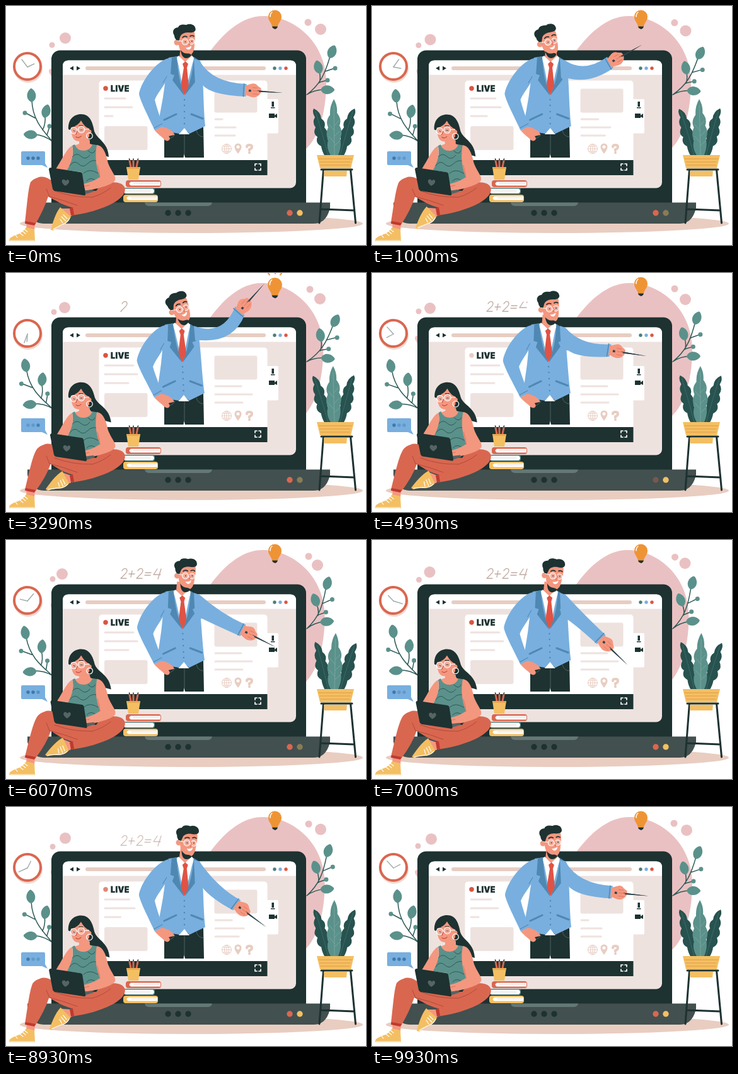
An HTML page for the animation above (10 s loop, 571 by 380 pixels).

```html
<!DOCTYPE html>
<html lang="en">
<head>
<meta charset="utf-8">
<title>Live lesson</title>
<style>
  html, body { margin: 0; height: 100%; overflow: hidden; background: #fff; }
  svg { display: block; width: 571px; height: 380px; }
  .dark { fill: #1d3231; } .skin { fill: #f4977f; } .white { fill: #fff; }
  .red { fill: #d96750; } .yellow { fill: #f4bf63; } .blue { fill: #78afdf; }
  .pale { fill: #eee2df; } .blush { fill: #e8cdc2; } .pink { fill: #eac1c2; }
  .teal { fill: #5b918b; } .deep { fill: #27524f; } .navy { fill: #4f88b2; }
  .line { fill: none; stroke-linecap: round; stroke-linejoin: round; }
  .ink { stroke: #1d3231; } .stem { stroke: #2d5a57; stroke-width: 1.5; }
  .crease { stroke: #b24a3b; stroke-width: 1; }
  .glasses { fill: #ffffff38; stroke: #fff; stroke-width: 1.1; }
</style>
</head>
<body>
<svg viewBox="0 0 571 380">
  <defs>
    <path id="leaf" d="M0 0C-9-4-9-15-2-21Q0-23 2-21C9-15 9-4 0 0Z"/>
    <path id="blade" d="M488 163Q499 168 500 179Q508 184 505 193Q513 202 510 211Q517 224 515 239H506Q501 231 500 223Q490 218 494 208Q486 203 491 193Q485 185 490 177Q485 169 488 163Z"/>
  </defs>

  <ellipse cx="294" cy="346" rx="272" ry="15" fill="#e9cdc1"/>
  <path id="blob" class="pink" d="M72 100C66 100 67 107 76 116L470 232C495 215 508 170 508 122C508 58 458 16 408 16C372 16 343 46 323 73C250 140 110 95 72 100Z"/>
  <g id="bubbles" class="pink"><circle r="9"/><circle r="4.500"/><circle r="9"/><circle r="5.500"/></g>

  <g id="branchL">
    <path class="line stem" d="M74 216C60 199 42 182 41 150M58 197Q63 188 62 174M73 215Q62 206 46 204M46 178L31 170M65 205L69 192"/>
    <g class="teal">
      <use href="#leaf" transform="translate(41 153)rotate(-3)"/>
      <use href="#leaf" transform="translate(61 178)rotate(14)"/>
      <use href="#leaf" transform="translate(50 205)rotate(-87)"/>
      <circle cx="30" cy="170" r="3.500"/><circle cx="69" cy="191" r="3.500"/>
    </g>
  </g>
  <g id="branchR">
    <path class="line stem" d="M477 141C498 125 506 108 514 80M497 122Q500 112 496 102M477 141Q489 133 505 133M506 104L521 99M498 121L510 118"/>
    <g class="teal">
      <use href="#leaf" transform="translate(513 83)rotate(22)"/>
      <use href="#leaf" transform="translate(498 108)rotate(-14)"/>
      <use href="#leaf" transform="translate(499 133)rotate(91)"/>
      <circle cx="522" cy="99" r="3.500"/><circle cx="510" cy="118" r="3.500"/>
    </g>
  </g>

  <!-- laptop screen -->
  <rect class="dark" x="72" y="70.500" width="404" height="255" rx="14"/>
  <rect class="pale" x="90" y="86.500" width="370" height="203" rx="9"/>
  <path class="white" d="M90 109.500V95.500Q90 86.500 99 86.500H451Q460 86.500 460 95.500V109.500Z"/>
  <path class="dark" d="M101 99L107 95.500V102.500ZM118 99L112 95.500V102.500Z"/>
  <rect class="blush" x="126" y="96" width="286" height="6" rx="3"/>
  <circle cx="426" cy="99" r="2.700" fill="#4c7d79"/><circle class="blue" cx="435" cy="99" r="2.700"/><circle cx="444" cy="99" r="2.700" fill="#e05344"/>
  <path class="white" d="M147.500 245V124Q147.500 118.500 153 118.500H409Q414.500 118.500 414.500 124V148H430Q432 148 432 150V200Q432 202.500 430 202.500H414.500V245Z"/>
  <rect class="pale" x="156" y="191" width="68.500" height="38" rx="3"/>
  <rect class="pale" x="330.500" y="131.500" width="68" height="38" rx="3"/>
  <g id="lines" class="line" stroke="#eee2df" stroke-width="3"></g>
  <circle class="blush" cx="158" cy="131" r="3.700"/><circle id="live" cx="158" cy="131" r="3.700" fill="#d95542"/>
  <text class="dark" x="166" y="135.700" font-family="Inter, sans-serif" font-weight="900" font-size="12.500" letter-spacing=".4" stroke="#1d3231" stroke-width=".4">LIVE</text>
  <path class="dark" d="M421.500 152H425V160H421.500ZM420 161H426.500V162.500H420ZM417 171H426V178H417ZM426 174L430 171V178L426 176Z"/>
  <g class="line" stroke="#e8cdc2" stroke-width="1">
    <circle cx="350" cy="227" r="7.500"/><ellipse cx="350" cy="227" rx="3.500" ry="7.500"/>
    <path d="M350 219.500V234.500M342.500 227H357.500M344 223H356M344 231H356"/>
    <path d="M382 224Q382 221 386 221Q390 221 390 224Q390 227 386 228V229.500M386 233V233.200" stroke-width="4"/>
  </g>
  <path class="blush" fill-rule="evenodd" d="M368 235Q362 227 362.500 224A5.500 5.500 0 0 1 373.500 224Q374 227 368 235ZM368 221.500A2.500 2.500 0 1 0 368 226.500A2.500 2.500 0 1 0 368 221.500Z"/>

  <!-- teacher -->
  <path class="dark" d="M251 192H313L314 241H284L282.500 235L281.500 241H251Z"/>
  <path class="line" stroke="#5c6e6b" stroke-width=".8" d="M251 211Q263 213 268 204M302 198Q304 208 313 208M283 205V236"/>
  <g id="body">
    <path class="blue" d="M258 82L272 80L297 82L308 87C314 103 312 150 316 191L291 203L283 195L275 203L245 198L243 178L249 145L254 110Z"/>
    <path class="white" d="M274 204L283 194L291 204ZM271 81L283 143L298 82Z"/>
    <path class="skin" d="M277 66L293 68L295 82L284 90L275 82Z"/>
    <path class="white" d="M274 79L284 89L276 99L270 82ZM295 79L284 89L292 99L299 83Z"/>
    <path d="M280 92L284.500 88L289 92L287 98L290 128L283 142L277 128L282 98Z" fill="#e05344"/>
    <path class="navy" d="M263 82L271 80C272 105 277 127 283 143L264 118L267 110L261 108ZM298 81L304 85L306 108L300 110L303 117L283 143C291 126 296 108 298 81Z"/>
    <g class="navy"><circle cx="283" cy="149" r="1.200"/><circle cx="283" cy="158" r="1.200"/><circle cx="283" cy="168" r="1.200"/><circle cx="283" cy="178" r="1.200"/><circle cx="283" cy="187" r="1.200"/></g>
    <path class="line" stroke="#4f88b2" stroke-width="3" d="M251 181L270 172M294 172L312 179"/>
    <path class="blue" d="M258 83C240 87 216 116 211 139C211 148 230 184 236 198L250 191C245 180 238 158 236 149C240 139 250 128 256 116Z"/>
    <path class="line" stroke="#4f88b2" stroke-width="1" d="M235 194L248 187M249 122Q252 117 255 112"/>
    <path class="skin" d="M236 198L247 192C257 193 268 201 267 205L258 207C263 212 257 217 252 213C246 207 240 203 236 198Z"/>
  </g>
  <path id="sleeve" class="blue"/>
  <path id="cuff" class="line" stroke="#4f88b2" stroke-width="1.500"/>
  <g id="hand">
    <path d="M0-1.500L58 0L0 2Z" fill="#30444a"/>
    <path class="skin" d="M-2-7L8-11Q14-13 18-8L23-5Q25 0 22 5Q16 12 8 10L-2 7Z"/>
    <path d="M4-1.500L58 0L4 2Z" fill="#30444a"/>
    <path class="skin" d="M7-6Q16-9 18-5Q14-1 20 0Q23 4 15 7Q9 8 8 2Z"/>
    <path class="line" stroke="#d9705c" stroke-width=".8" d="M10-5L17-5M11 0H20M11 5L19 5"/>
  </g>
  <g id="head">
    <path class="skin" d="M272 42C272 64 277 79 287 79C297 79 299 70 299 59Q301 48 298 39Z"/>
    <path class="dark" d="M277 70C281 75 285 76 289 75.500Q293 76 294 78Q291 83 285 83C280 82 278 77 277 70Z"/>
    <circle class="skin" cx="271" cy="58" r="4.500"/>
    <path class="dark" d="M271 55Q267 51 267 47C263 41 265 35 273 34C275 29 281 29 286 30C292 27 299 30 300 34C303 41 296 43 289 42C282 42 277 45 276 50L274 56Z"/>
    <path class="line ink" stroke-width="1.700" d="M280 50Q283 47 287 49M292 48Q295 46 298 48"/>
    <path class="dark" d="M283.500 56h1.800v2h-1.800zM294 55h1.800v2h-1.800z"/>
    <circle class="glasses" cx="284" cy="57" r="4.800"/><circle class="glasses" cx="294.500" cy="56.500" r="4.400"/>
    <path class="line" stroke="#fff" d="M279 56L271 55"/>
    <path class="white" d="M285 66Q290 67 294 63Q294 69 289 69.500Q286 69 285 66Z"/>
    <path class="line" stroke="#d9624f" d="M290 55Q293 60 290 62"/>
  </g>

  <rect class="dark" x="148" y="245" width="266.500" height="24"/>
  <path class="line" stroke="#fff" stroke-width="1.700" stroke-linecap="butt" d="M395 254V251H398M401 251H404V254M404 258V261H401M398 261H395V258"/>

  <!-- laptop base -->
  <path d="M34 312.500H514V321Q508 346 488 346H60Q40 346 34 321Z" fill="#42504f"/>
  <path d="M220 312.500H327Q326 318 319 318H228Q221 318 220 312.500Z" fill="#647876"/>
  <g class="dark"><circle cx="257" cy="329" r="4.700"/><circle cx="273" cy="329" r="4.700"/><circle cx="289" cy="329" r="4.700"/></g>
  <circle id="lampR" class="red" cx="450" cy="329" r="4.700"/><circle id="lampY" class="yellow" cx="466" cy="329" r="4.700"/>

  <!-- books and pencils -->
  <rect class="red" x="190" y="277" width="56" height="11" rx="4"/><path class="white" d="M198 279.500H245V285.500H198Q193 282.500 198 279.500Z"/>
  <rect x="188" y="289" width="48" height="10" rx="3" fill="#4c7d79"/><path class="white" d="M188 290.500H233Q237 294 233 298H188Z"/>
  <rect class="yellow" x="186" y="300" width="55" height="12" rx="4"/><path class="white" d="M194 302.500H240V308.500H194Q189 305.500 194 302.500Z"/>
  <path class="line" stroke="#d9c8c0" stroke-width=".7" d="M202 282H243M190 294H229M199 305H238"/>
  <path class="line" stroke="#d96750" stroke-width="3" d="M196 246L198 256M202 246V256M209 246L207 256"/>
  <path class="line ink" stroke-width="1.500" d="M195.500 243L196 245M202 243V245M209.500 243L209 245"/>
  <path class="yellow" d="M191 256H213L210 276H194Z"/><path d="M191 256H213L212.500 259H191.500Z" fill="#e9a94f"/>

  <!-- potted plant -->
  <path class="line ink" stroke-width="3" d="M503.500 260L497 345M546.500 260L554.500 345M499 323L552 325M500 260H549"/>
  <g id="plant">
    <use href="#blade" class="deep"/><use href="#blade" class="deep" transform="translate(1041)scale(-1 1)"/>
    <path class="teal" d="M520 148Q526 158 525 170Q533 180 529 190Q535 200 530 211Q533 224 526 239H516Q507 226 511 213Q506 203 511 193Q506 183 514 173Q513 160 520 148Z"/>
    <path class="line" stroke="#7eaaa3" stroke-width=".8" d="M520 158L521 237M521 190L528 182M521 207L529 199M521 222L530 214M521 198L512 188M521 217L512 207"/>
    <path class="line" stroke="#44716c" stroke-width=".8" d="M491 168Q501 200 511 237M550 168Q540 200 530 237"/>
  </g>
  <path class="yellow" d="M493 237H552L547 258H498ZM504 262H541L540 271H505Z"/>
  <path class="line" stroke="#e39a45" stroke-width="1.200" d="M496 243H549M498 248H546M499 253H545"/>

  <!-- clock -->
  <circle cx="35" cy="99" r="21" fill="none" stroke="#f0d9d0" stroke-width="4"/>
  <circle cx="34" cy="96" r="21" fill="#fff" stroke="#d96750" stroke-width="4"/>
  <g class="line" stroke="#9fa9a9" stroke-width="1.400"><path id="hour" d="M34 97V85"/><path id="minute" d="M34 97V82"/></g>

  <path class="blue" d="M26 231H60Q62 231 62 233V250L66 257L57 253H26Q24 253 24 251V233Q24 231 26 231Z"/>
  <g id="typing" fill="#3f78aa"><circle cx="35" cy="242" r="2.700"/><circle cx="43" cy="242" r="2.700"/><circle cx="51" cy="242" r="2.700"/></g>

  <!-- student -->
  <path id="hair" class="dark" d="M120 174C134 174 138 187 140 199C144 212 162 216 163 240C150 236 139 233 133 222L116 190Z"/>
  <path class="skin" d="M33 342L46 345L45 358L32 356Z"/>
  <path class="yellow" d="M32 352L45 355L46 374H5Q4 368 16 364Q26 361 32 352Z"/>
  <path class="line" stroke="#fff" stroke-width="1.200" d="M6 373H45M22 361L27 365M26 358L31 362M29 355L34 359M15 364L18 368"/>
  <g id="foot">
    <path class="skin" d="M88 322L103 322L105 333L97 338Z"/>
    <path class="yellow" d="M86 320L103 335Q98 346 88 349Q80 352 75 357L71 356C74 345 78 330 86 320Z"/>
    <path class="line" stroke="#fff" stroke-width="1.200" d="M101 337Q98 345 88 348L75 355M91 332L97 338M88 335L95 342M86 339L90 345"/>
  </g>
  <path id="leg" class="red"/>
  <path d="M31 342L47 345L45 349L30 346Z" fill="#c0392f"/>
  <path class="red" d="M148 287C164 277 184 279 188 288C193 300 174 314 150 322C135 328 118 331 104 333L101 322C115 317 128 311 136 304Z"/>
  <path d="M101 322L106 320L108 332L103 333Z" fill="#c0392f"/>
  <path class="line crease" d="M69 303Q66 296 64 291M69 303Q92 309 113 317M77 294Q105 305 137 304M137 304Q154 299 166 289"/>
  <g id="upper">
    <path class="skin" d="M116 207H133L133 219L146 223L140 235H109L106 223L116 219Z"/>
    <path class="teal" d="M109 220Q112 230 124 230Q134 229 137 220L144 221C143 240 148 251 151 270L147 290H124L119 264L96 261C102 245 109 240 105 222Z"/>
    <path class="line" stroke="#2d5a57" stroke-width="1" d="M105 240Q112 232 119 239Q126 246 133 237M101 254Q108 244 115 251T129 251T143 246M123 266Q132 257 146 266M128 278Q135 270 144 279M130 230Q138 238 141 230"/>
    <path class="skin" d="M106 222C97 224 90 243 79 259L96 263C103 249 108 240 105 222ZM144 221C155 222 159 236 162 250C168 265 175 270 173 277C168 285 147 290 126 294L122 283Q137 280 149 272C142 252 141 240 144 221Z"/>
    <path class="line" stroke="#d9705c" stroke-width=".9" d="M149 272Q148 262 145 253M123 287L132 285"/>
    <g id="face">
      <path class="dark" d="M99 196C98 181 107 172 119 172C133 172 139 185 137 200L134 214L116 202Z"/>
      <path class="skin" d="M103 193Q114 191 119 182Q125 193 132 195L132 207Q129 214 119 215C108 216 104 211 103 193Z"/>
      <circle class="skin" cx="132" cy="200" r="3.500"/>
      <circle cx="132.500" cy="206.500" r="4.800" fill="none" stroke="#fff" stroke-width="1.200"/>
      <path class="line ink" stroke-width="1.200" d="M104 192L109 191M116 190L122 190M107 198L109 199M118 197L121 197"/>
      <circle class="glasses" cx="107.500" cy="198" r="5.200"/><circle class="glasses" cx="119.500" cy="196.500" r="5.200"/>
      <path class="line" stroke="#fff" d="M125 196L132 196"/>
      <path class="line" stroke="#c64e3f" stroke-width="1.200" d="M113 199L111 204M111 208Q115 211 119 207"/>
    </g>
  </g>
  <g id="notebook">
    <path d="M123 300L139 295L137 292L120 294Z" fill="#566564"/>
    <path class="dark" d="M71 257L117 264Q120 264 121 267L126 299Q126 302 123 301L77 294Q75 293 74 291L68 260Q68 257 71 257Z"/>
    <path d="M94 286Q87 281 89 277Q92 274 95 278Q98 274 100 278Q101 282 94 286Z" fill="#566564"/>
  </g>

  <!-- idea -->
  <g id="bulb">
    <path d="M416 17A10.500 10.500 0 1 1 437 17C437 24 432 26 431 33H422C421 26 416 24 416 17Z" fill="#ee9435"/>
    <path class="dark" d="M422 32.500H431L430 35L427 37L423 35Z"/>
    <path class="line" stroke="#fff" stroke-width="1.500" d="M419 17Q419 12 422 10"/>
  </g>
  <path id="rays" class="line" stroke="#ee9435" stroke-width="2" d="M418 3L415-1M427 1V-4M435 3L438-1"/>
  <g id="sum" class="line" stroke="#c0aaa2" stroke-width="1.300"></g>
</svg>
<script>
const LOOP = 10000, KEYS = [0, 1930, 3290, 4930, 6070, 7930], N = KEYS.length;
const $ = id => document.getElementById(id);
const clamp = v => Math.min(1, Math.max(0, v));
const set = (el, attrs) => { for (const k in attrs) el.setAttribute(k, attrs[k]); };
const spin = (id, a, x, y) => set($(id), { transform: `rotate(${a} ${x} ${y})` });
const shift = (id, x, y) => set($(id), { transform: `translate(${x} ${y})` });

// Smooth cyclic curve through one value per key time
function pose(t, ...v) {
  const at = i => v[(i + N) % N];
  const time = i => KEYS[(i + N) % N] + LOOP * Math.floor(i / N);
  const slope = i => (at(i + 1) - at(i)) / (time(i + 1) - time(i));
  const tangent = i => {
    const a = slope(i - 1), b = slope(i);
    return a * b > 0 ? 2 * a * b / (a + b) : 0;
  };
  let i = N - 1;
  while (KEYS[i] > t) i--;
  const h = time(i + 1) - time(i), s = (t - time(i)) / h, r = 1 - s;
  return at(i) * r * r * (1 + 2 * s) + at(i + 1) * s * s * (3 - 2 * s)
    + h * s * r * (r * tangent(i) - s * tangent(i + 1));
}

// 1 while the phase lies between a and b, with short fades
function pulse(t, count, a, b) {
  const p = t * count / LOOP % 1;
  return clamp((p - a) / .05) * clamp((b - p) / .05);
}

function add(parent, attrs) {
  const el = document.createElementNS('http://www.w3.org/2000/svg', 'path');
  set(el, attrs);
  return $(parent).appendChild(el);
}

// x, y, short and long width
const lines = [[157, 147, 32, 45], [157, 161, 43, 51], [157, 175, 12, 37],
  [332, 180, 11, 41], [332, 193, 32, 58], [332, 206, 31, 43]]
  .map(([x, y, short, long]) => ({ x, y, short, long, el: add('lines', {}) }));

const strokes = ['M184 49Q187 44 191 46Q194 50 188 55L182 61H191', 'M195 54H204', 'M200 49L198 59',
  'M209 49Q212 44 216 46Q219 50 213 55L207 61H216', 'M221 52H230', 'M220 56H229',
  'M240 46L234 55H245', 'M246 46L241 62']
  .map(d => add('sum', { d, pathLength: 1 }));

function drawArm(t) {
  const ex = pose(t, 326, 356, 354, 330, 336, 335), ey = pose(t, 132, 103, 103, 126, 126, 139);
  const wx = pose(t, 381, 374, 371, 378, 376, 353), wy = pose(t, 134, 60, 60, 123, 144, 166);
  const pit = pose(t, 125, 107, 107, 123, 125, 128);
  const angle = pose(t, 4, -48, -48, 9, 27, 54), a = angle * Math.PI / 180;
  const nx = -Math.sin(a) * 10, ny = Math.cos(a) * 10;
  const top = `${wx - nx} ${wy - ny}`, bottom = `${wx + nx} ${wy + ny}`;
  set($('sleeve'), { d: `M298 84L307 87Q${ex - nx} ${ey - ny} ${top}L${bottom}Q${ex + nx} ${ey + ny} 311 ${pit}L300 ${pit}Z` });
  const cx = wx - Math.cos(a) * 4, cy = wy - Math.sin(a) * 4;
  set($('cuff'), { d: `M${cx - nx} ${cy - ny}L${cx + nx} ${cy + ny}` });
  set($('hand'), { transform: `translate(${wx} ${wy})rotate(${angle})` });
}

function drawScreen(t) {
  const grow = pose(t, 0, 1, 1, 1, 1, .98);
  for (const l of lines) set(l.el, { d: `M${l.x} ${l.y}h${l.short + (l.long - l.short) * grow}` });
  set($('live'), { opacity: 1 - pulse(t, 3, .4, .7) });
  set($('lampR'), { opacity: 1 - .65 * pulse(t, 3, .42, .54) });
  set($('lampY'), { opacity: 1 - .6 * pulse(t, 4, .25, .55) });
  [[.55, .9], [.2, .75], [0, .66]].forEach(([a, b], i) =>
    set($('typing').children[i], { opacity: 1 - .6 * pulse(t, 5, a, b) }));
}

function drawIdea(t) {
  const lit = clamp((t - 2700) / 350) * clamp((4200 - t) / 350);
  set($('bulb'), { transform: `translate(426.5 ${20 + 2 * lit})scale(${1 + .08 * lit})translate(-426.5 -20)` });
  set($('rays'), { opacity: lit });
  const written = (t - 3090) / 2080 * strokes.length;
  strokes.forEach((el, i) => {
    const p = clamp(written - i);
    set(el, { 'stroke-dasharray': `${p} 2`, opacity: p ? clamp((9300 - t) / 500) : 0 });
  });
}

function drawScenery(t) {
  const width = 1 - .014 * (1 - Math.cos(t * 4 * Math.PI / LOOP));
  set($('blob'), { transform: `translate(290)scale(${width} 1)translate(-290)` });
  const dots = $('bubbles').children;
  const bx = pose(t, 94, 91, 93, 92, 89, 94), by = pose(t, 51, 55, 55, 56, 54, 49);
  const sx = pose(t, 73, 75, 76, 74, 74, 75), sy = pose(t, 62, 63, 62, 61, 62, 64);
  [[bx, by], [sx, sy], [bx + 405, by - 14], [sx + 406, sy - 36]]
    .forEach(([cx, cy], i) => set(dots[i], { cx, cy }));
  spin('branchL', pose(t, 0, -4.5, -7.5, -8.5, -8, -2.5), 74, 216);
  spin('branchR', pose(t, 0, 4.5, 4.5, -1.5, -6, -8), 477, 141);
  spin('plant', pose(t, 0, -1, -.8, .5, 1.8, .9), 522, 240);
  spin('hour', 65 + t * .036, 34, 97);
  spin('minute', 323 + t * .072, 34, 97);
}

function drawPeople(t) {
  const lean = pose(t, 0, -1.2, -2.5, -2.4, -2.2, -.4);
  set($('body'), { transform: `translate(283 200)skewX(${-lean})translate(-283 -200)translate(${lean * .3})` });
  set($('head'), { transform: `translate(${lean * .8})rotate(${pose(t, 0, -17, -15, -2, 5, 10)} 285 83)` });
  drawArm(t);
  const knee = pose(t, 0, 8, 10, 11, 11, 8);
  set($('leg'), { d: `M${50 + knee} 273C${60 + knee} 268 ${72 + knee} 276 ${80 + knee} 284L125 293L180 296L112 322`
    + `C94 319 78 309 ${67 + knee * .4} 303Q${60 + knee * .4} 324 46 348L30 345`
    + `C${33 + knee * .3} 320 ${35 + knee * .7} 290 ${39 + knee} 280Q${43 + knee} 275 ${50 + knee} 273Z` });
  spin('hair', pose(t, 0, -3, -4, -4, -4, -3), 128, 185);
  shift('face', 0, pose(t, 0, .8, 1.6, 1.8, 1.6, .6));
  shift('upper', pose(t, 0, -.5, 0, .4, .2, -.2), pose(t, 0, .5, .2, 0, 0, .5));
  shift('notebook', pose(t, 0, .3, 2, 3, 2.6, .6), pose(t, 0, -.3, -2, -2.5, -2.2, -.3));
  spin('foot', pose(t, 0, 12, 20, 23, 23, 12), 102, 327);
}

function frame(now) {
  const t = now % LOOP;
  drawScenery(t);
  drawScreen(t);
  drawPeople(t);
  drawIdea(t);
  requestAnimationFrame(frame);
}
frame(performance.now());
</script>
</body>
</html>
```
